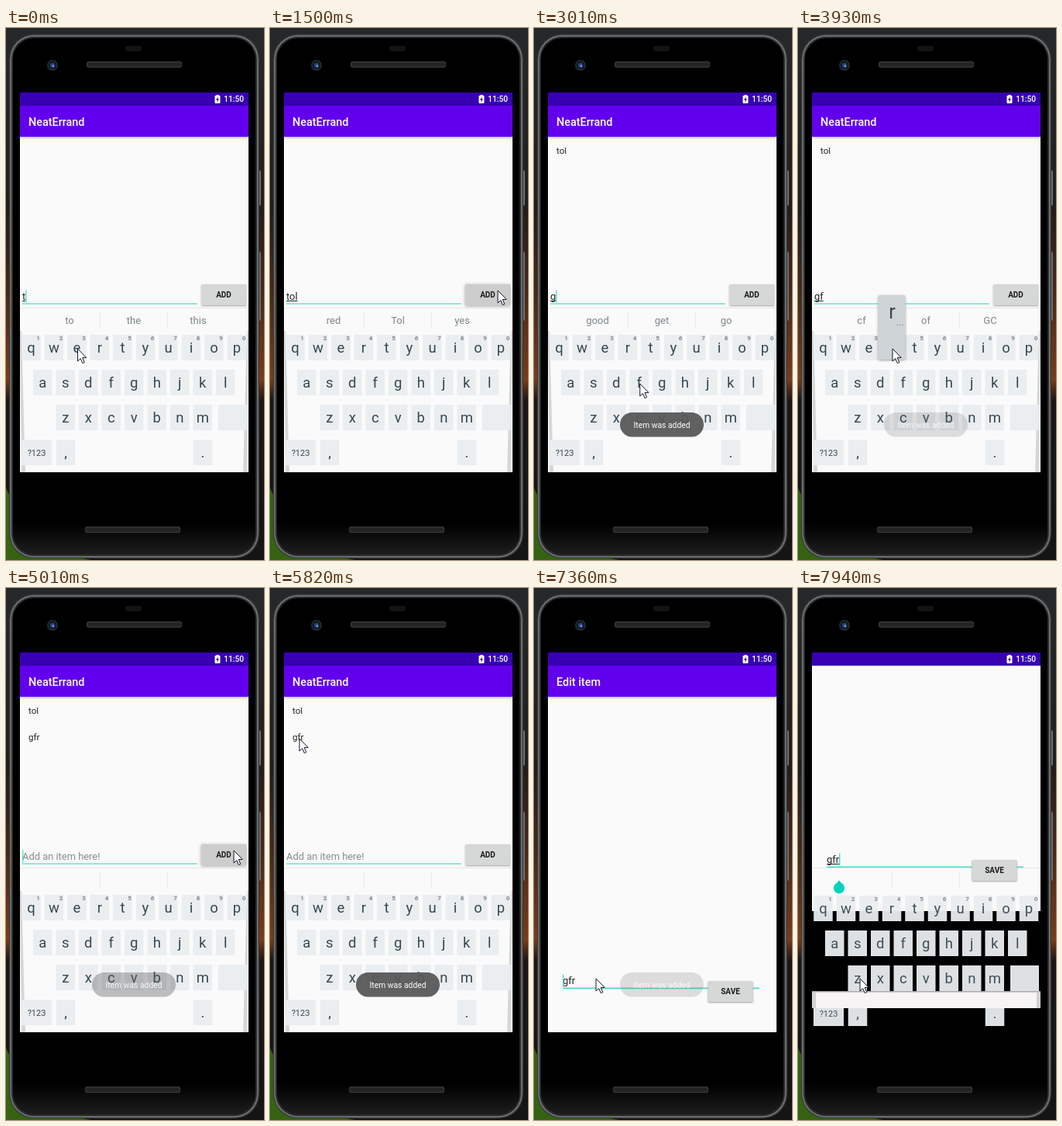
Write an HTML page with a canvas that moves like this. It is 333 px wide and 685 px high and loops after 8000 ms.

```html
<!DOCTYPE html>
<html>
<head>
<meta charset="utf-8">
<style>
html, body { margin: 0; width: 100%; height: 100%; overflow: hidden; background: #000; }
canvas { display: block; }
</style>
</head>
<body>
<canvas id="stage" width="333" height="685"></canvas>
<script>
const ctx = document.getElementById('stage').getContext('2d');
const LOOP = 8000, TEAL = '#4bdcc9', PAPER = '#fafafa', BOTTOM = 572;
const STEP = LOOP / 59;
const EDIT = 47, KEYBOARD = 57;

const rows = ['qwertyuiop', 'asdfghjkl', 'zxcvbnm'];
const indent = [0, .5, 1.5];
const spots = { ADD: [294, 338], item: [38, 194], field: [80, 503] };

// The pointer travels during from..to, presses at tap and lets go at release.
const move = (from, to, at, tap, release, text, hints = '') => ({ from, to, at, tap, release, text, hints });
const script = [
  move(0, 0, 'e', -1, 0, 't', 'to the this'),
  move(0, 1, 'e', 1, 2, 'to', 're the ye'),
  move(1, 4, 'd', 4, 6, 'tol', 'red Tol yes'),
  move(6, 11, 'ADD', 11, 12, ''),
  move(12, 18, 'g', 19, 20, 'g', 'good get go'),
  move(20, 22, 'f', 24, 25, 'gf', 'cf of GC'),
  move(25, 28, 'r', 29, 30, 'gfr', 'get for girl'),
  move(31, 35, 'ADD', 36, 37, ''),
  move(38, 43, 'item', EDIT, EDIT + 1),
  move(50, 54, 'field', 54, KEYBOARD)
];

function keyCentre(c) {
  const r = rows.findIndex(s => s.includes(c));
  return [32.5 + 29.5 * (rows[r].indexOf(c) + indent[r]), 412 + 45 * r];
}

const place = at => spots[at] || keyCentre(at).map(v => v + 1);

function rect(x, y, w, h, fill, r = 0) {
  ctx.fillStyle = fill;
  ctx.beginPath();
  ctx.roundRect(x, y, w, h, r);
  ctx.fill();
}

function poly(points, fill, stroke) {
  ctx.beginPath();
  points.forEach(([x, y]) => ctx.lineTo(x, y));
  ctx.closePath();
  ctx.fillStyle = fill;
  ctx.fill();
  if (stroke) { ctx.strokeStyle = stroke; ctx.lineWidth = 1; ctx.stroke(); }
}

function dot(x, y, r, fill) {
  rect(x - r, y - r, 2 * r, 2 * r, fill, r);
}

function text(s, x, y, size, fill, align = 'left', weight = 400) {
  ctx.font = `${weight} ${size}px Roboto, sans-serif`;
  ctx.textAlign = align;
  ctx.fillStyle = fill;
  ctx.fillText(s, x, y);
  return ctx.measureText(s).width;
}

function raised(x, y, w, h, fill, blur, r = 0) {
  ctx.save();
  ctx.shadowColor = 'rgba(0,0,0,.35)';
  ctx.shadowBlur = blur;
  ctx.shadowOffsetY = 1;
  rect(x, y, w, h, fill, r);
  ctx.restore();
}

function fade(stops) {
  const g = ctx.createLinearGradient(0, 0, 0, 685);
  stops.forEach(([at, c]) => g.addColorStop(at, c));
  return g;
}

function phone() {
  rect(0, 0, 333, 685, fade([[0, '#25282a'], [.35, '#241d1a'], [.5, '#4a2815'],
    [.66, '#7a3c18'], [.7, '#1c1613'], [1, '#141414']]));
  poly([[0, 592], [8, 610], [30, 670], [110, 685], [0, 685]], '#356312');
  for (const [y, h] of [[183, 46], [288, 89]]) rect(324, y, 5, h, '#6a6d6f', 2);
  ['#3a3c3d', '#77797a', '#2c2e2f'].forEach((c, i) =>
    rect(4 + 1.5 * i, 8 + 1.5 * i, 323 - 3 * i, 675 - 3 * i, c, 32 - 1.5 * i));
  rect(9, 13, 313, 665, fade([[0, '#000'], [.93, '#000'], [1, '#222']]), 27);
  rect(154, 23, 21, 7, '#141414', 3);
  for (const [x, y] of [[104, 43], [102, 642]]) {
    rect(x, y, 123, 8, '#3c3c3c', 3);
    rect(x + 1, y + 1, 121, 6, '#242424', 3);
  }
  ['#26282c', '#10141f', '#2c4a88'].forEach((c, i) => dot(60, 48, 7 - 2 * i, c));
  dot(61, 49, 1.2, '#7f9fd8');
}

function statusBar() {
  rect(18, 83, 295, 17, '#3700b3');
  rect(269.5, 87, 7, 10, '#fff', 1);
  rect(271.5, 86, 3, 2, '#fff');
  poly([[273.6, 88.5], [271, 92.7], [272.7, 92.7], [272.4, 95.5], [275, 91.5], [273.4, 91.5]], '#3700b3');
  text('11:50', 307, 95.3, 10.2, '#fff', 'right', 500);
}

function page(title) {
  rect(18, 100, 295, BOTTOM - 100, PAPER);
  raised(18, 100, 295, 40, '#6200ee', 3);
  text(title, 29, 126, 14.4, '#fff', 'left', 500);
}

function button(label, x, y, pressed) {
  raised(x, y, 58, 27, pressed ? '#cdcdcd' : '#d6d7d7', pressed ? 4 : 2, 1.5);
  text(label, x + 29, y + 17, 10, '#1c1c1c', 'center', 700);
}

function field(s, x, base, right, composing, caret, line) {
  rect(x, base + 5, right - x, line, TEAL);
  const w = text(s, x, base, 12.9, '#222');
  if (composing && s) rect(x, base + 1.5, w, 1, '#222');
  if (caret) rect(composing ? x + w : x, base - 12, 1.3, 16, TEAL);
}

function key(x, y, w, label, size = 18.5) {
  rect(x - w / 2, y - 17, w, 33, '#eaeef1');
  text(label, x, y + size * .35, size, '#37474f', 'center');
}

function keys() {
  for (const c of rows.join('')) key(...keyCentre(c), 24.5, c);
  [...rows[0]].forEach((c, i) =>
    text((i + 1) % 10, keyCentre(c)[0] + 9, 402, 8, '#7b868b', 'center', 700));
  key(292.5, 502, 37, '');
  key(39.5, 547, 39, '?123', 11);
  key(77, 547, 24.5, ',');
  key(254, 547, 24.5, '.');
}

function edges() {
  for (const side of [-1, 1]) {
    const x = d => 165.5 + side * (147.5 - d);
    poly([[x(0), 390], [x(2), 390], [x(7), BOTTOM], [x(2), BOTTOM]], '#d5d7d8');
  }
}

function suggestions(words) {
  rect(18, 360, 295, 1, '#e4e6e7');
  for (const x of [121, 208]) rect(x, 367, 1, 18, '#e3e5e6');
  words.split(' ').forEach((w, i) => text(w, 82 + 83 * i, 381, 13, '#7b868b', 'center'));
}

function popup(c) {
  const [x, y] = keyCentre(c);
  raised(x - 17.5, y - 68, 35, 83, '#cfd4d6', 3, 2);
  text(c, x + .5, y - 38, 25, '#37474f', 'center');
  text('...', x + 11, y - 29, 13, '#7b868b', 'center');
}

function listScreen(n) {
  const state = script.filter(m => m.release <= n && m.text !== undefined).pop();
  const held = script.find(m => m.tap <= n && n < m.release);
  page('NeatErrand');
  script.flatMap((m, i) => m.at === 'ADD' && m.release <= n ? script[i - 1].text : [])
    .forEach((s, i) => text(s, 29, 162 + 34.4 * i, 11.6, '#222'));
  if (!state.text) text('Add an item here!', 21, 349.5, 12.9, '#8b8b8b');
  field(state.text, 21, 349.5, 247, true, (n - state.release) % 7 < 4, 1.3);
  button('ADD', 252, 330, script.some(m => m.at === 'ADD' && m.tap <= n && n <= m.release));
  suggestions(state.hints);
  edges();
  keys();
  if (held && !spots[held.at]) popup(held.at);
}

// The keyboard is caught half-way through sliding in.
function risingKeyboard() {
  ctx.save();
  ctx.translate(0, 1);
  ctx.globalAlpha = .95;
  keys();
  ctx.restore();
  rect(18, 519, 295, 22, '#f7f4f6');
  rect(18, 519, 295, 1.5, '#aaa');
  for (const x of [18, 308]) rect(x, 521, 5, 20, '#d0d0d0');
  dot(53, 386.5, 7, '#00d3bd');
  poly([[53, 376.5], [59, 383], [47, 383]], '#00d3bd');
}

function editScreen(n) {
  const panned = n >= KEYBOARD, risen = n > KEYBOARD;
  const pan = risen ? 156 : panned ? 90 : 0;
  ctx.save();
  ctx.beginPath();
  ctx.rect(18, 100, 295, BOTTOM - 100);
  ctx.clip();
  if (panned) rect(18, 100, 295, 473, '#000');
  ctx.translate(0, -pan);
  page('Edit item');
  field('gfr', 37, 509.5, 291, panned, panned || (n - EDIT) % 7 < 4, 1.8);
  ctx.translate(0, pan);
  if (risen) suggestions('');
  button('SAVE', 224.5, 506 - pan, false);
  if (risen) risingKeyboard();
  ctx.restore();
}

function toast(n) {
  const added = script.filter(m => m.at === 'ADD' && m.release <= n).pop();
  if (!added) return;
  const age = (n - added.release) * STEP;
  const alpha = Math.min(1, .4 + age / 250, (2370 - age) / 330);
  if (alpha <= 0) return;
  ctx.globalAlpha = alpha;
  rect(111, 495, 108, 31.5, 'rgba(88,88,88,.94)', 16);
  ctx.globalAlpha = .8 + .2 * alpha; // white shows through the fading pill
  text('Item was added', 165, 514.5, 10.3, '#fff', 'center');
  ctx.globalAlpha = 1;
}

function mouse(n) {
  const i = script.findLastIndex(m => m.from <= n);
  const { from, to, at } = script[i];
  const [x0, y0] = place(script[Math.max(0, i - 1)].at);
  const [x1, y1] = place(at);
  const k = Math.min(1, (n - from) / (to - from || 1));
  ctx.save();
  ctx.translate(x0 + (x1 - x0) * k, y0 + (y1 - y0) * k);
  poly([[0, 0], [0, 16], [3.7, 12.6], [6.3, 18.6], [8.8, 17.5], [6.2, 11.6], [11.2, 11.4]], '#fff', '#15152a');
  ctx.restore();
}

function draw(time) {
  const n = Math.floor((time % LOOP + 20) / STEP);
  phone();
  statusBar();
  if (n <= EDIT) listScreen(n);
  if (n >= EDIT) {
    ctx.globalAlpha = n > EDIT ? 1 : .6;
    editScreen(n);
    ctx.globalAlpha = 1;
  }
  toast(n);
  mouse(n);
}

const start = performance.now();
function frame() {
  draw(performance.now() - start);
  requestAnimationFrame(frame);
}
frame();
</script>
</body>
</html>
```
